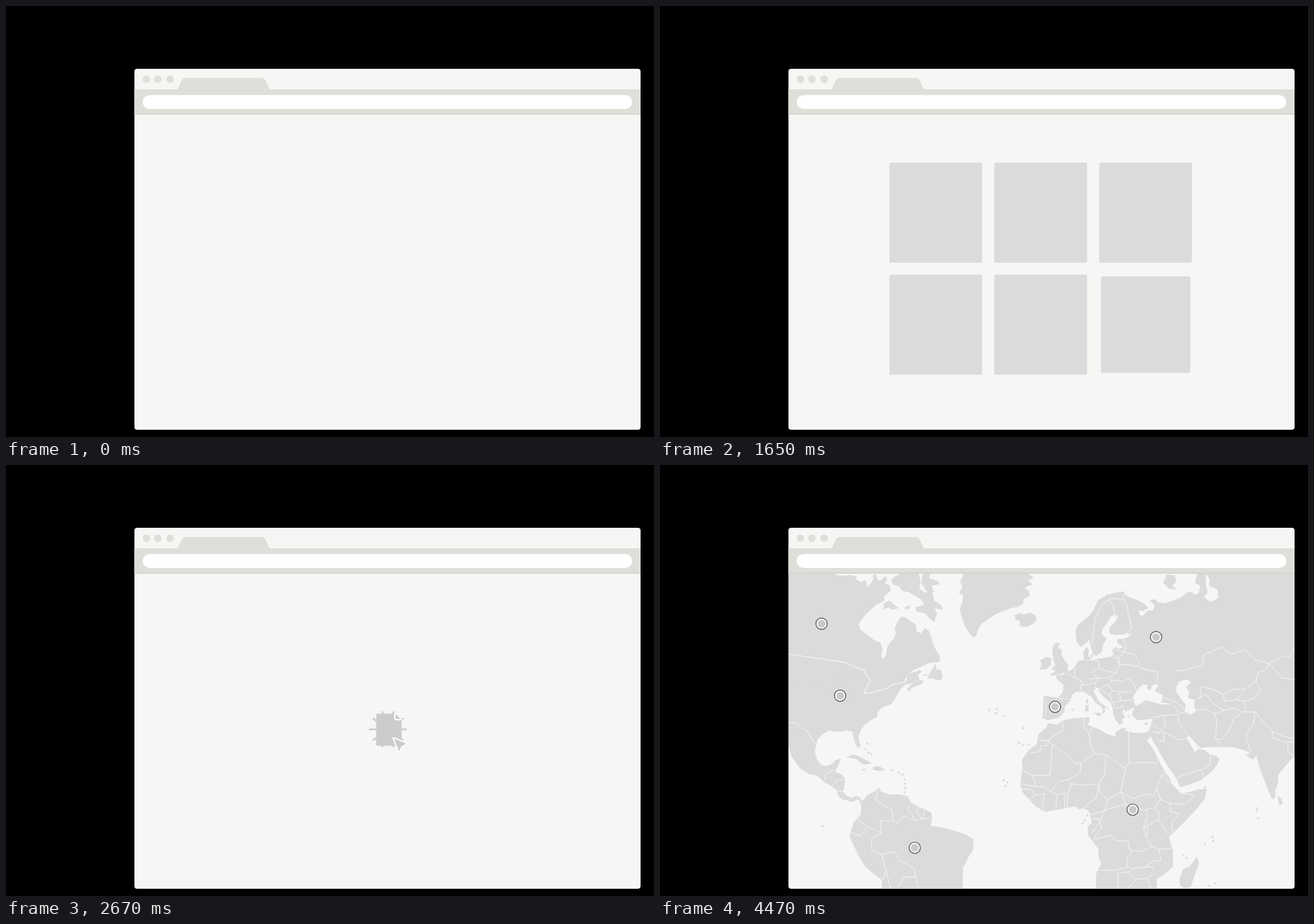
An HTML page that plays this animation: 917x611 px, repeating every 8 s.

```html
<!DOCTYPE html>
<html lang="en">
<head>
<meta charset="utf-8">
<title>Browser loading a map</title>
<style>
  html, body { margin: 0; width: 100%; height: 100%; overflow: hidden; background: #000; }
  svg { display: block; width: 917px; height: 611px; }
  .land { fill: #dbdbdb; }
  .sea { fill: #f6f6f4; }
  .border { fill: none; stroke: #f6f6f4; stroke-width: .9; stroke-linejoin: round; }
</style>
</head>
<body>
<svg viewBox="0 0 917 611" width="917" height="611">
  <defs>
    <clipPath id="page"><path d="M182 154H898V597Q898 601 894 601H186Q182 601 182 597Z"/></clipPath>
  </defs>
  <rect width="917" height="611"/>
  <rect x="181.7" y="89" width="716.3" height="511.7" rx="4" fill="#f6f6f4"/>

  <g id="map" clip-path="url(#page)">
    <g class="land">
      <!-- North America -->
      <path d="M182,154 247,154 249,156 258,157 268,156 279,158 277,162 284,166 290,163 293,168 291,173 296,171 302,161 301,156 306,155 309,164 314,163 318,157 322,163 318,168 325,170 327,178 321,183 317,187 318,192 305,199 290,213 281,226 284,234 292,240 303,248 312,252 315,262 313,271 316,275 320,270 321,260 325,252 331,246 334,238 332,232 336,222 341,215 348,216 355,222 362,226 363,235 369,239 375,231 381,236 384,245 388,258 396,271 396,279 380,281 370,286 358,291 350,297 300,330 182,330Z"/>
      <path d="M182,310 350,296 362,293 368,290 370,293 365,298 367,304 358,309 346,312 340,318 335,327 332,333 327,339 314,344 308,350 307,357 300,361 290,368 284,376 281,385 282,391 284,398 281,402 277,397 274,386 272,378 264,376 256,378 247,378 240,376 231,381 223,389 221,398 219,406 222,417 228,425 235,427 243,424 248,419 256,416 252,426 248,435 256,438 262,444 261,455 259,463 264,469 271,472 278,469 284,472 285,478 279,474 272,478 263,475 258,474 252,469 250,461 243,456 233,450 222,440 213,439 199,431 187,415 182,399Z"/>
      <path d="M340,154 366,154 369,165 367,175 375,181 385,178 388,192 398,199 400,205 389,203 392,211 388,223 382,218 375,210 363,208 361,202 374,198 369,190 360,185 352,180 343,179 338,172 330,170 327,163 334,157Z"/>
      <path d="M372,154 382,154 381,161 392,164 396,169 384,171 388,180 377,179 370,168Z M317,196 325,192 331,198 338,203 329,205 323,202 316,205Z M345,203 354,198 352,205Z"/>
      <path d="M390,281 391,290 397,290 400,298 398,305 391,305 386,302 378,303 383,293Z M349,318 358,309 367,305 374,306 369,311 356,316 353,321Z M371,296 379,297 376,299Z"/>
      <path d="M263,414 274,410 286,415 300,423 288,425 278,417 268,415Z M302,428 310,427 319,432 312,434 301,432Z M284,431 291,431 290,434Z M325,431 332,432 330,435Z"/>
      <!-- Greenland, Iceland -->
      <path d="M430,154 425,165 428,174 423,181 429,185 428,195 424,205 427,215 431,228 438,239 443,244 447,243 450,234 455,225 464,219 474,212 486,207 496,203 507,201 514,196 514,190 523,186 522,179 516,174 527,169 521,164 529,160 524,156 519,154Z"/>
      <path d="M502,213 508,210 515,212 524,209 531,213 533,219 528,225 518,230 508,228 510,222 503,219Z"/>
      <!-- South America -->
      <path d="M283,477 285,483 284,495 280,500 274,507 271,516 268,526 273,537 280,552 290,569 303,580 314,588 314,600 428,600 429,571 437,555 443,546 444,531 433,524 415,518 400,514 383,511 385,503 384,493 375,488 363,483 355,478 350,469 338,467 325,467 313,463 309,457 305,462 293,468 289,474Z"/>
      <!-- Europe -->
      <path d="M558,253 566,252 563,259 569,262 568,269 573,277 578,284 576,292 566,297 555,299 552,297 560,292 554,289 560,283 557,278 556,270 555,262Z M547,272 554,274 553,284 546,290 537,290 540,282 538,277Z"/>
      <path d="M543,327 550,328 562,330 582,333 573,342 572,350 565,358 553,361 549,362 541,359 542,345Z"/>
      <path d="M562,331 570,322 571,311 562,304 560,299 571,297 574,292 582,291 588,284 592,278 600,276 599,266 603,258 607,262 606,270 611,276 618,275 630,273 636,272 642,268 640,262 645,258 649,261 655,258 648,253 646,247 658,246 663,243 700,220 740,240 740,345 727,341 715,337 690,334 672,343 662,348 655,347 655,352 659,358 654,360 655,367 650,368 645,362 641,353 641,346 638,337 628,329 622,322 619,316 613,320 616,325 621,335 628,340 637,347 629,344 630,349 624,356 626,353 627,346 622,341 616,337 610,328 606,326 600,322 589,321 583,326 581,333Z"/>
      <path d="M589,246 588,235 591,227 600,220 607,214 614,204 620,192 632,184 645,181 656,179 659,185 672,190 680,215 668,235 657,240 645,241 636,239 636,230 643,224 648,216 644,212 638,215 632,225 626,233 625,240 632,246 627,255 625,265 617,271 613,268 609,256 608,248 603,252 596,258 590,252Z"/>
      <path d="M603,333 606,331 606,338 603,338Z M602,341 607,340 606,349 602,350Z M613,352 624,351 623,357Z M581,347 586,345 584,349Z M651,372 662,374 656,376Z M684,367 691,364 689,369Z M608,269 613,268 612,274Z"/>
      <!-- Asia -->
      <path d="M656,180 661,187 674,191 686,197 691,203 683,207 669,205 672,213 683,214 690,206 698,206 700,199 693,192 701,190 705,195 715,196 735,189 746,181 752,179 757,184 763,181 764,171 757,167 760,154 898,154 898,412 884,428 875,439 875,450 871,460 871,471 866,474 859,457 853,441 847,425 844,412 840,417 835,416 829,410 836,409 826,404 810,400 775,400 765,401 757,393 749,384 735,345 735,240 663,240Z"/>
      <path d="M672,343 690,334 708,339 727,340 740,345 746,340 775,360 775,400 765,401 757,393 749,384 745,386 751,397 757,407 762,402 772,405 779,411 787,412 792,417 788,426 778,437 766,446 750,453 736,457 731,445 722,432 713,418 704,402 697,391 695,384 692,388 690,379 694,372 697,360 686,361 676,362 668,355 670,346Z"/>
      <path d="M717,155 728,156 731,165 725,171 732,177 720,175 712,167Z M874,469 880,473 881,481 876,482Z"/>
      <!-- Africa -->
      <path d="M549,366 563,368 570,362 584,359 598,358 607,357 608,363 605,368 612,371 622,375 632,381 644,385 645,378 653,374 660,377 672,380 690,379 692,388 689,391 697,401 703,413 709,425 716,437 721,443 724,451 733,461 737,465 748,464 762,460 774,459 771,473 760,487 746,502 734,514 725,523 720,527 723,537 726,546 726,570 715,579 703,587 703,600 617,600 617,580 624,566 620,553 621,545 614,536 606,525 605,513 611,507 609,497 606,490 599,487 592,488 588,484 577,486 566,488 545,492 533,485 523,475 513,464 510,454 511,443 513,428 512,418 522,404 533,396 536,381 546,373Z"/>
      <path d="M760,555 763,565 757,580 751,598 742,600 736,596 735,588 740,573 750,569Z"/>
      <g id="isles"></g>
    </g>
    <g class="sea">
      <path d="M671,337 669,329 676,318 683,311 690,312 689,317 694,320 696,313 703,310 705,313 700,320 711,326 711,333 707,338 698,336 688,333 680,338 673,342Z"/>
      <path d="M730,316 735,307 746,304 752,308 744,314 749,322 747,330 756,333 756,340 758,350 750,354 742,349 744,340 737,331 731,322Z"/>
      <path d="M773,154 778,163 777,171 789,177 790,189 780,194 770,188 775,180 772,168Z"/>
    </g>
    <g class="border">
      <path stroke-width="1.2" d="M182,268 215,273 263,280 275,286 288,290 291,296 298,305 291,318 289,324 297,323 321,317 330,311 345,308 349,301 347,314"/>
      <path d="M182,365 193,366 201,374 208,376 213,385 220,396 M233,447 235,438 244,432 249,436 M243,456 250,447 261,445 M251,462 260,463"/>
      <path d="M309,460 305,475 317,483 328,488 330,505 312,504 313,522 299,530 300,547 314,552 332,548 338,560 359,571 362,584 M270,520 283,526 293,513 304,517 313,522 M280,503 293,512 M330,505 337,508 345,498 355,502 M355,478 350,488 358,497 359,504 371,502 383,500 M366,484 364,493 371,502 M375,488 372,502 M314,552 320,575 315,588 M320,575 326,600 M362,584 345,584 338,598 M362,584 366,600"/>
      <path d="M564,330 581,333 M547,333 545,358 M574,295 590,303 598,308 595,318 600,323 M588,286 586,296 590,303 M600,276 620,277 621,287 611,293 618,302 604,304 M595,312 607,311 617,308 622,304 618,302 M621,287 634,293 646,294 650,283 647,274 636,272 M618,302 634,302 646,294 M617,308 615,316 623,317 634,311 640,305 634,302 M640,305 655,307 663,303 670,309 674,319 M634,311 640,320 654,322 668,321 M622,318 636,326 640,320 M650,322 652,334 668,333 M636,326 640,336 652,334 M640,336 645,345 657,342"/>
      <path d="M650,283 662,283 676,286 690,291 705,293 703,306 M650,283 649,273 657,265 672,269 678,281 676,286 M657,265 659,255 655,247 M643,262 657,265 M640,269 649,273 M659,238 668,232 663,212 661,198 655,190 657,182 M611,256 613,236 616,218 625,198 638,190 M644,212 641,199 636,189 655,190"/>
      <path d="M712,329 730,336 741,345 M727,341 733,350 744,352 M697,358 712,355 733,354 M712,355 716,368 705,380 696,378 M697,367 705,374 M705,380 712,378 735,390 746,387 M733,354 735,367 744,378 749,384 M705,391 714,391 712,379 M732,443 748,437 766,432 778,425 779,412 M766,432 770,444"/>
      <path d="M730,291 740,292 748,289 770,284 768,270 795,258 808,268 828,262 842,276 862,281 858,290 846,294 843,307 828,318 812,318 797,325 782,318 766,314 764,330 755,334 M862,281 884,270 890,273 898,261 M862,281 880,302 898,304"/>
      <path d="M764,330 772,325 782,337 798,348 786,353 771,346 757,348 M798,348 810,345 826,350 813,358 806,374 796,389 786,388 788,365 786,353 M786,388 794,398 M797,325 799,335 815,333 828,335 828,350 M815,333 828,318 M828,335 841,330 850,320 843,307 M826,350 842,350 852,362 867,378 883,385 898,388 M842,350 840,366 829,383 836,407 M867,378 866,386 884,393 898,392 M888,394 889,408 897,412"/>
      <path d="M570,363 570,377 558,383 549,391 536,390 M549,391 549,397 539,398 538,406 524,408 M549,391 575,411 588,423 596,423 615,409 609,396 607,381 600,372 600,358 M607,381 612,371 M663,377 664,422 705,422 M664,422 659,430 631,411 615,409 M555,397 552,440 527,440 514,433 M596,423 594,437 578,446 566,448 552,463 544,456 533,456 527,440 M511,452 533,456 M512,459 526,460 531,468 522,475"/>
      <path d="M631,411 629,439 621,452 598,454 582,452 578,446 M659,430 655,449 652,464 634,474 623,466 621,452 M621,454 617,473 605,480 601,487 M582,452 577,467 576,486 M552,463 562,467 560,489 M562,467 576,465 M572,467 573,487 M544,466 541,481 545,491 M531,468 544,466 M652,464 669,473 690,466 699,469 703,458 709,441 716,437 M709,441 723,450 731,459 M703,458 708,474 722,480 744,481 757,468 735,465"/>
      <path d="M652,464 659,481 670,488 687,489 700,486 708,474 M722,480 722,491 736,495 M700,486 706,492 705,503 720,524 M736,495 725,506 725,521 M659,481 641,486 629,490 622,506 611,523 M634,474 629,490 608,496 M611,502 622,502 625,515 614,529 M687,489 690,499 684,514 687,526 696,541 680,548 665,546 662,533 645,533 639,525 614,530 M684,514 705,503 M696,541 706,545 724,543"/>
      <path d="M706,545 709,561 700,561 685,570 671,572 661,570 661,558 670,546 M617,574 643,575 661,570 M671,572 663,577 648,578 648,600 M663,577 674,587 662,600 M674,587 690,586 700,579 698,570 685,570 M690,586 695,600 M685,514 690,515 690,526 685,524"/>
    </g>
  </g>

  <g id="cards"></g>
  <g id="spinner" fill="none" stroke-width="2.3">
    <circle cx="537.4" cy="376.4" r="31.1" stroke="#dddddb"/>
    <path id="arc" d="M568.5 376.4A31.1 31.1 0 0 1 537.4 407.5" stroke="#888" stroke-linecap="round"/>
  </g>
  <path id="rays" stroke="#ccc" stroke-width="2.6" fill="none"/>
  <g id="file">
    <path d="M1.5 0H28L38.5 9V47Q38.5 48.5 37 48.5H1.5Q0 48.5 0 47V1.5Q0 0 1.5 0Z" fill="#ccc"/>
    <path d="M28 -.5V6Q28 9 31 9H39" fill="none" stroke="#fff" stroke-width="2"/>
    <path id="cursor" d="M25.8 37.2Q25 36 27 36.6L45.5 44Q47.6 45.2 45.6 46.4L39 50L35.6 57Q34.4 59 33.3 57Z" stroke="#fff" stroke-width="2" stroke-linejoin="round"/>
  </g>
  <g id="pins"></g>

  <!-- window chrome -->
  <rect x="181.7" y="118" width="716.3" height="35.5" fill="#dfdfda"/>
  <rect x="181.7" y="152.7" width="716.3" height="1.3" fill="#d0d0c9"/>
  <path d="M242.5 118.5L249 105Q250.5 102 254 102H362Q365.5 102 367 105L373.5 118.5Z" fill="#dfdfda"/>
  <g fill="#dfdfda">
    <circle cx="198.7" cy="103.8" r="5.4"/>
    <circle cx="214.8" cy="103.8" r="5.4"/>
    <circle cx="232.2" cy="103.8" r="5.4"/>
  </g>
  <rect x="193.4" y="126.2" width="692.8" height="19.8" rx="9.9" fill="#fff"/>
</svg>
<script>
const LOOP = 8000;
const NS = 'http://www.w3.org/2000/svg';
const $ = id => document.getElementById(id);
const clamp = x => Math.max(0, Math.min(1, x));
const span = (t, start, length) => clamp((t - start) / length);
const mix = (a, b, p) => a + (b - a) * p;
const outCubic = p => 1 - (1 - p) ** 3;
const sine = p => (1 - Math.cos(Math.PI * p)) / 2;

function add(parent, tag, attrs = {}) {
  const node = document.createElementNS(NS, tag);
  for (const key in attrs) node.setAttribute(key, attrs[key]);
  return parent.appendChild(node);
}

function place(node, x, y, scale) {
  node.setAttribute('transform', `translate(${x} ${y}) scale(${scale})`);
  node.setAttribute('visibility', scale > 0.001 ? 'visible' : 'hidden');
}

const isles = '466,347 477,346 476,352 487,356 514,373 508,394 514,397 521,396 486,447 492,450 489,455 ' +
  '230,512 293,395 291,403 295,408 299,410 338,436 343,439 346,446 347,452 347,458 346,464 605,496 601,504 ' +
  '598,508 741,554 745,557 771,537 782,527 783,533 777,596 785,593 845,487 844,491 846,501 771,457 659,349 663,357';
isles.split(' ').forEach((pair, i) => {
  const [cx, cy] = pair.split(',');
  add($('isles'), 'ellipse', { cx, cy, rx: 1.3 + i % 3 * .3, ry: 1.8 - i % 2 * .4 });
});

const cards = Array.from({ length: 6 }, (_, i) => {
  const node = add($('cards'), 'rect', { x: -65.6, y: -71, width: 131.2, height: 142, rx: 2.5, fill: '#dbdbdb' });
  return { node, x: 390.2 + i % 3 * 148.5, y: 293 + Math.floor(i / 3) * 158.7 };
});

const spots = [[228.6, 225], [254.9, 327], [360.5, 542.6], [559, 342.8], [702, 244], [668.9, 488.6]];
const pins = spots.map(([x, y]) => {
  const node = add($('pins'), 'g');
  add(node, 'circle', { r: 8, fill: '#fff', stroke: '#666', 'stroke-width': 1.4 });
  add(node, 'circle', { r: 5.5, fill: '#c9c9c9' });
  return { node, x, y };
});

function drawSpinner(t) {
  $('spinner').setAttribute('opacity', span(t, 0, 150) * (1 - span(t, 780, 150)));
  $('arc').setAttribute('transform', `rotate(${8 + (t - 750) * .49} 537.4 376.4)`);
}

function drawCards(t) {
  const leave = span(t, 2370, 270) ** 2;
  cards.forEach((c, i) => place(c.node, c.x, c.y, outCubic(span(t, 1140 + i * 70, 240)) * (1 - leave)));
}

function drawFile(t) {
  const rise = outCubic(span(t, 1710, 250));
  const p = sine(span(t, 1960, 660));
  const curve = (a, b, c) => (1 - p) ** 2 * a + 2 * p * (1 - p) * b + p * p * c;
  const x = curve(92, 268, 541.8);
  const y = curve(mix(557, 491, rise), 416.5, 375.3);
  const scale = 1 - span(t, 2620, 204) ** 2;
  place($('file'), x - 19.2 * scale, y - 24.2 * scale, scale);
  $('file').setAttribute('opacity', rise);
  $('cursor').setAttribute('fill', t < 2600 ? '#dbdbdb' : '#ccc');
}

function drawRays(t) {
  const p = span(t, 2600, 180);
  const inner = 8 + 32 * p * p, outer = 18 + 22 * p;
  let d = '';
  if (p > 0 && p < 1) for (let i = 0; i < 10; i++) {
    const c = Math.cos(i * Math.PI / 5), s = Math.sin(i * Math.PI / 5);
    d += `M${540.6 + c * inner} ${374.8 + s * inner}L${540.6 + c * outer} ${374.8 + s * outer}`;
  }
  $('rays').setAttribute('d', d);
}

function draw(t) {
  drawSpinner(t);
  drawCards(t);
  drawFile(t);
  drawRays(t);
  $('map').setAttribute('opacity', sine(span(t, 2760, 330)));
  pins.forEach((pin, i) => place(pin.node, pin.x, pin.y, outCubic(span(t, 3570 + i * 120, 300))));
}

const start = performance.now();
function tick() {
  draw((performance.now() - start) % LOOP);
  requestAnimationFrame(tick);
}
tick();
</script>
</body>
</html>
```
